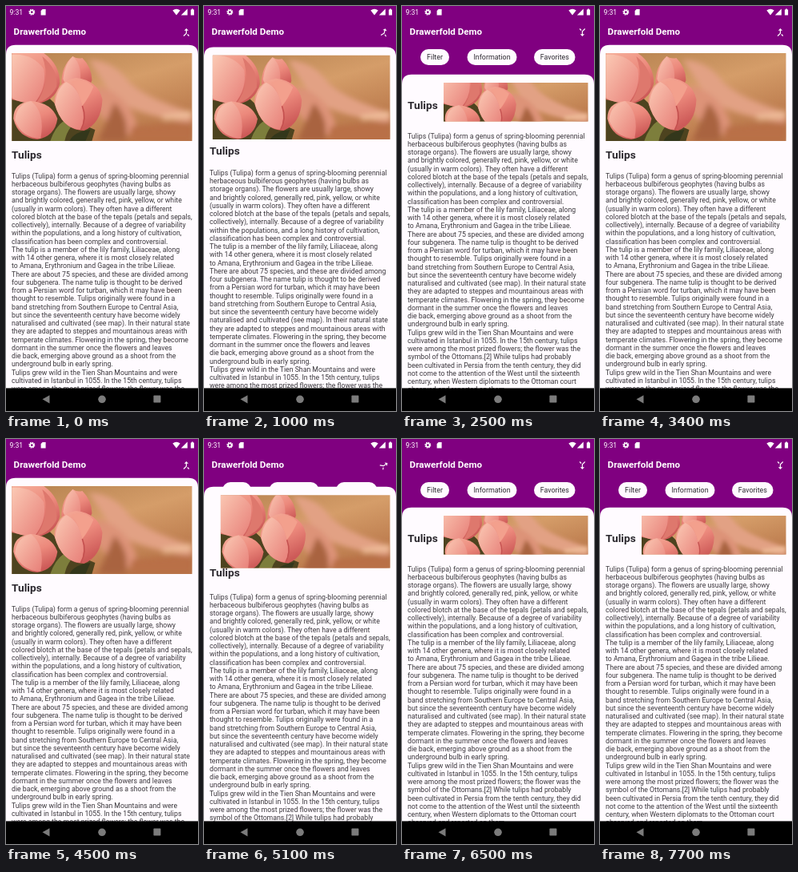
Write an HTML page that moves like this. It is 240 px wide and 507 px high and loops after 8.1 s.

```html
<!DOCTYPE html>
<html lang="en">
<head>
<meta charset="utf-8">
<title>Sliding sheet</title>
<style>
  html, body { margin: 0; width: 100%; height: 100%; overflow: hidden; background: #800080; }
  svg { display: block; }
  #stage { width: 100vw; height: 100vh; }
  text { font-family: Roboto, "Noto Sans", sans-serif; }
  .body { font-size: 8.72px; fill: #3b383d; }
  .chip { font-size: 8.9px; fill: #2c2930; text-anchor: middle; }
  .bold { font-weight: 700; }
</style>
</head>
<body>
<svg id="stage" viewBox="0 0 240 507">
  <defs>
    <linearGradient id="wall" x1="0" y1="0" x2=".6" y2="1">
      <stop offset="0" stop-color="#b5814f"/>
      <stop offset=".5" stop-color="#d59d69"/>
      <stop offset="1" stop-color="#b87649"/>
    </linearGradient>
    <linearGradient id="petal" x1="0" y1="0" x2=".5" y2="1">
      <stop offset="0" stop-color="#f6b09c"/>
      <stop offset=".55" stop-color="#ec897c"/>
      <stop offset="1" stop-color="#cd5a58"/>
    </linearGradient>
    <linearGradient id="pale" x1="0" y1="0" x2="1" y2="1">
      <stop offset="0" stop-color="#fbc9b4"/>
      <stop offset="1" stop-color="#e77f78"/>
    </linearGradient>
    <filter id="soft" x="-20%" y="-20%" width="140%" height="140%"><feGaussianBlur stdDeviation=".6"/></filter>
    <filter id="haze" x="-50%" y="-50%" width="200%" height="200%"><feGaussianBlur stdDeviation="3.5"/></filter>
  </defs>

  <rect width="240" height="507" fill="#800080"/>

  <!-- status bar -->
  <g fill="#fff">
    <text x="4.5" y="11" font-size="8.6">9:31</text>
    <circle cx="32.3" cy="7.7" r="2.2" fill="none" stroke="#fff" stroke-width="1.7"/>
    <circle cx="32.3" cy="7.7" r="3.4" fill="none" stroke="#fff" stroke-width="1.2" stroke-dasharray="1.5 1.17"/>
    <path d="M45.6 4h4v7.5h-6V6z"/>
    <path d="M208.3 5.4Q213 2 217.7 5.4L213 11.6z"/>
    <path d="M226.8 3.6v8h-8z"/>
    <path d="M230.9 4.4h1.2v-.9h1.8v.9h1.2v7.2h-4.2z"/>
  </g>

  <!-- toolbar -->
  <text class="bold" x="9.6" y="36.1" font-size="11.6" fill="#fff">Drawerfold Demo</text>
  <path id="icon" fill="#fff" d="M17 20.41L18.41 19 15 15.59 13.59 17zM7.5 8H11v5.59L5.59 19 7 20.41l6-6V8h3.5L12 3.5z"/>

  <g id="chips"></g>

  <path id="sheet" fill="#fffbff" d="M0 440V12Q0 0 12 0H228Q240 0 240 12V440z"/>

  <svg id="photo" viewBox="0 0 225 110" preserveAspectRatio="xMidYMid slice">
    <rect width="225" height="110" fill="url(#wall)"/>
    <g filter="url(#haze)">
      <path d="M96 8Q128 10 146 36Q166 56 225 74V88Q160 78 128 58z" fill="#e2a184"/>
      <path d="M104 40Q136 48 150 74Q160 92 150 104Q118 92 104 68z" fill="#dd9378"/>
      <path d="M128 62Q148 82 142 110H108z" fill="#a9643f"/>
      <path d="M150 92L225 86V110H146z" fill="#b97046"/>
      <path d="M186 78L225 72V80L190 84z" fill="#eebc98"/>
    </g>
    <g filter="url(#soft)">
      <path d="M0 52L40 50 76 84 104 96 100 110H0z" fill="#4d431f"/>
      <path d="M48 110Q54 92 66 84L74 92Q68 100 66 110z" fill="#7d7e3c"/>
      <path d="M72 110Q78 98 98 96L92 110z" fill="#33371b"/>
      <path d="M62 38Q62 16 76 4Q82 8 88 6Q100 18 100 34Q96 46 80 46z" fill="url(#petal)"/>
      <path d="M76 4Q90 16 84 44Q66 42 64 32Q66 14 76 4z" fill="url(#pale)"/>
      <path d="M0 0H40Q60 14 60 38Q54 62 26 64L0 58z" fill="url(#petal)"/>
      <path d="M0 2Q26 0 40 20Q44 44 28 63Q8 62 0 56z" fill="url(#pale)"/>
      <path d="M38 4Q58 20 56 42Q48 58 30 63Q50 36 38 4z" fill="#de786d"/>
      <path d="M2 82Q2 62 24 60Q50 62 57 82Q54 104 32 108Q8 106 2 82z" fill="url(#petal)"/>
      <path d="M24 60Q42 74 36 107Q12 106 4 84Q6 64 24 60z" fill="url(#pale)"/>
      <path d="M53 62Q54 36 80 31Q108 34 113 58Q112 88 90 97Q62 96 53 62z" fill="url(#petal)"/>
      <path d="M68 36Q84 44 88 66Q92 84 86 96Q62 94 54 64Q56 44 68 36z" fill="url(#pale)"/>
      <path d="M74 36Q90 30 102 42Q96 56 88 66Q84 48 74 36z" fill="#f3a08d"/>
      <path d="M88 66Q94 82 86 96" fill="none" stroke="#c4504f" stroke-width="1.6"/>
    </g>
  </svg>

  <text id="title" class="bold" x="7" font-size="13.7" fill="#2b282e">Tulips</text>
  <g id="copy"></g>

  <!-- navigation bar -->
  <rect y="478.4" width="240" height="29"/>
  <g fill="#7b7b7b">
    <path d="M45.5 492.3L54.5 487.2V497.4z"/>
    <circle cx="120" cy="492.3" r="4.8"/>
    <rect x="184.4" y="487.6" width="9" height="9" rx=".8"/>
  </g>
</svg>

<script>
const LOOP = 8100, STEP = 100, LINE = 10.25;
const DURATION = 700;
const OPEN = 888, CLOSE = 2690, REOPEN = 4907;

// spans in which the screen freezes
const stalls = [[1000, 1200], [2800, 3000], [3000, 3400]];

const copy = `Tulips (Tulipa) form a genus of spring-blooming perennial
herbaceous bulbiferous geophytes (having bulbs as
storage organs). The flowers are usually large, showy
and brightly colored, generally red, pink, yellow, or white
(usually in warm colors). They often have a different
colored blotch at the base of the tepals (petals and sepals,
collectively), internally. Because of a degree of variability
within the populations, and a long history of cultivation,
classification has been complex and controversial.
The tulip is a member of the lily family, Liliaceae, along
with 14 other genera, where it is most closely related
to Amana, Erythronium and Gagea in the tribe Lilieae.
There are about 75 species, and these are divided among
four subgenera. The name tulip is thought to be derived
from a Persian word for turban, which it may have been
thought to resemble. Tulips originally were found in a
band stretching from Southern Europe to Central Asia,
but since the seventeenth century have become widely
naturalised and cultivated (see map). In their natural state
they are adapted to steppes and mountainous areas with
temperate climates. Flowering in the spring, they become
dormant in the summer once the flowers and leaves
die back, emerging above ground as a shoot from the
underground bulb in early spring.
Tulips grew wild in the Tien Shan Mountains and were
cultivated in Istanbul in 1055. In the 15th century, tulips
were among the most prized flowers; the flower was the
symbol of the Ottomans.[2] While tulips had probably
been cultivated in Persia from the tenth century, they did
not come to the attention of the West until the sixteenth
century, when Western diplomats to the Ottoman court
observed and reported on them.`;

// [label, left, width]
const chips = [["Filter", 23, 36], ["Information", 81.5, 62], ["Favorites", 165, 51.5]];

const el = id => document.getElementById(id);
const mix = (a, b, p) => a + (b - a) * p;

function set(id, attrs) {
  for (const name in attrs) el(id).setAttribute(name, attrs[name]);
}

// cubic-bezier(.4, 0, .2, 1), solved by bisection
function ease(u) {
  if (u <= 0) return 0;
  if (u >= 1) return 1;
  let lo = 0, hi = 1, s;
  for (let i = 0; i < 20; i++) {
    s = (lo + hi) / 2;
    const x = 1.2 * s * (1 - s) ** 2 + .6 * s * s * (1 - s) + s ** 3;
    if (x < u) lo = s; else hi = s;
  }
  return s * s * (3 - 2 * s);
}

const moved = (t, from) => ease((t - from) / DURATION);
const openness = t => moved(t, OPEN) - moved(t, CLOSE) + moved(t, REOPEN);

function shownTime(t) {
  const stall = stalls.find(([from, to]) => t >= from && t < to);
  return stall ? stall[0] : Math.floor(t / STEP) * STEP;
}

function draw(t) {
  const p = openness(t);
  const left = mix(7.2, 52, p), top = mix(59, 96, p);
  set("sheet", { transform: `translate(0 ${mix(48.7, 85.7, p)})` });
  set("photo", { x: left, y: top, width: 232.7 - left, height: mix(169, 144.5, p) - top });
  set("title", { y: mix(191, 129, p) });
  set("copy", { transform: `translate(7 ${mix(215.6, 165.7, p)})` });
  set("icon", { transform: `translate(225.4 33) rotate(${180 * p}) scale(.583) translate(-12 -12)` });
}

el("chips").innerHTML = chips.map(([label, x, w]) =>
  `<rect x="${x}" y="54" width="${w}" height="20" rx="10" fill="#fffbff"/>
   <text class="chip" x="${x + w / 2}" y="67.1">${label}</text>`).join("");
el("copy").innerHTML = copy.split("\n").map((line, i) =>
  `<text class="body" y="${i * LINE}">${line}</text>`).join("");

const start = performance.now();
function tick() {
  draw(shownTime((performance.now() - start) % LOOP));
  requestAnimationFrame(tick);
}
tick();
</script>
</body>
</html>
```
